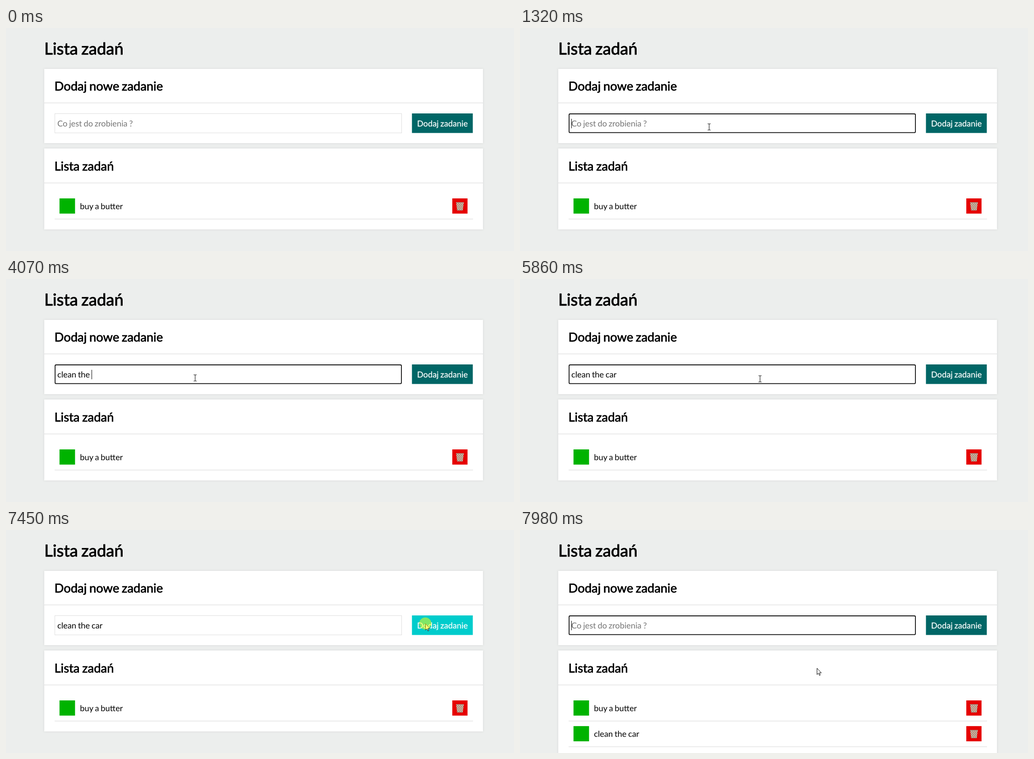
Write an HTML page that moves like this. It is 1128 px wide and 496 px high and loops after 8000 ms.

```html
<!DOCTYPE html>
<html lang="pl">
<head>
<meta charset="utf-8">
<title>Lista zadań</title>
<style>
  html, body { margin: 0; width: 100%; height: 100%; overflow: hidden; background: #eceeed; }
  svg { display: block; width: 1128px; height: 496px; font: 18.29px Lato, sans-serif; text-rendering: geometricPrecision; }
  text { word-spacing: -.05em; }
  .panel { fill: #fff; filter: drop-shadow(0 0 2.5px #d6d8d7); }
  .line { fill: #ddd; }
  .head { stroke: #000; stroke-linejoin: round; }
  .h1 { font-size: 36.57px; stroke-width: 1px; }
  .h2 { font-size: 27.43px; stroke-width: .8px; }
</style>
</head>
<body>
<svg viewBox="0 0 1128 496">
  <defs>
    <pattern id="mesh" width="4" height="5" x="999" y="388" patternUnits="userSpaceOnUse">
      <rect width="4" height="5" fill="#d9cdb9"/>
      <path d="M0 0l4 5M4 0l-4 5" stroke="#93604f" stroke-width=".9"/>
    </pattern>
    <g id="row">
      <rect x="118.8" y="379" width="34.5" height="33.8" fill="#00b300"/>
      <rect x="991" y="379" width="33.8" height="33.8" fill="#e60000"/>
      <path d="M999.5 388h17l-2.2 17.5h-12.6z" fill="url(#mesh)"/>
      <path d="M999 388.3h18M1001.7 405h12.6" stroke="#a39a8c" stroke-width="1.6"/>
      <rect class="line" x="108" y="424.3" width="929" height="1.2"/>
    </g>
    <path id="bar" d="M-3.5-7h2.5l1 1 1-1h2.5M0-6v12M-3.5 7h2.5l1-1 1 1h2.5"/>
  </defs>
  <text class="head h1" x="85" y="59">Lista zadań</text>

  <rect class="panel" x="85" y="91" width="974" height="165"/>
  <text class="head h2" x="107.5" y="139">Dodaj nowe zadanie</text>
  <rect class="line" x="85" y="166" width="974" height="1.2"/>
  <rect x="108.5" y="190.5" width="770" height="42.8" fill="#fff" stroke="#ddd"/>
  <rect id="ring" x="109" y="191" width="769" height="41.7" rx="2.5" fill="#fff" stroke="#101010" stroke-width="1.8"/>
  <text id="field" x="114" y="219"></text>
  <rect id="caret" y="202" width="1" height="21"/>
  <rect id="button" x="901.4" y="190" width="135.1" height="43.5"/>
  <text x="912.8" y="219" fill="#fff" stroke="#fff" stroke-width=".25">Dodaj zadanie</text>

  <rect id="list" class="panel" x="85" y="268" width="974" height="180"/>
  <text class="head h2" x="107.5" y="316.5">Lista zadań</text>
  <rect class="line" x="85" y="344" width="974" height="1.2"/>
  <use href="#row"/>
  <text x="164.3" y="402.7">buy a butter</text>
  <g id="added">
    <use href="#row" y="57.2"/>
    <text x="164.3" y="459.9">clean the car</text>
  </g>

  <path id="arrow" d="M.5.5v14l3.2-3 2.1 5 2.1-.9-2.1-4.8h4.4z" fill="#fff" stroke="#000"/>
  <g id="beam" fill="none">
    <use href="#bar" stroke="#fff" stroke-width="2.6"/>
    <use href="#bar" stroke="#222" stroke-width="1.2"/>
  </g>
  <circle id="click" r="13.5" fill="#ff0" fill-opacity=".5"/>
</svg>
<script>
const LOOP = 8000, ENTER = 90, FOCUS = 1160, PRESS = 7450, ADDED = 7550, BLINK = 600;
const $ = id => document.getElementById(id);
const show = (id, on) => $(id).setAttribute('visibility', on ? 'visible' : 'hidden');
const pen = document.createElement('canvas').getContext('2d');

// Each word is typed at its own steady pace
const words = [
  { text: 'clean ', at: 1720, gap: 240 },
  { text: 'the ', at: 3500, gap: 190 },
  { text: 'car', at: 4540, gap: 315 }
];
const keys = words.flatMap(w => [...w.text].map((char, i) => ({ char, at: w.at + i * w.gap })));

// Pointer moves along Bézier curves
const moves = [
  { from: ENTER, to: 850, curve: [[965, 484], [560, 405], [421, 231]] },
  { from: 910, to: 1040, curve: [[421, 231], [420, 220]] },
  { from: 5700, to: 6420, curve: [[421, 220], [760, 235], [900, 150], [925, 208]] },
  { from: 6510, to: 6610, curve: [[925, 208], [931, 208]] },
  { from: 7715, to: 7980, curve: [[931, 208], [659, 307]] }
];

const ease = p => (1 - Math.cos(Math.PI * p)) / 2;
const mix = (a, b, u) => a.map((v, k) => v + (b[k] - v) * u);
const bezier = (pts, u) => pts.length === 1 ? pts[0]
  : bezier(pts.slice(1).map((q, i) => mix(pts[i], q, u)), u);

function pointer(t) {
  const move = moves.filter(m => m.from <= t).pop() || moves[0];
  const p = (t - move.from) / (move.to - move.from);
  return bezier(move.curve, ease(Math.min(1, Math.max(0, p))));
}

function draw(t) {
  const done = keys.filter(k => k.at <= t);
  const typed = t < ADDED ? done.map(k => k.char).join('') : '';
  const field = $('field');
  field.textContent = typed || 'Co jest do zrobienia ?';
  field.setAttribute('fill', typed ? '#000' : '#757575');

  const focused = t >= FOCUS && t < PRESS || t >= ADDED;
  const lastInput = t >= ADDED ? ADDED : done.length ? done[done.length - 1].at : FOCUS;
  const spaces = typed.split(' ').length - 1;
  pen.font = '18.29px Lato, sans-serif';
  $('caret').setAttribute('x', Math.round(114 + pen.measureText(typed).width - spaces * .9));
  show('caret', focused && (t - lastInput) % (2 * BLINK) < BLINK);
  show('ring', focused);

  const [x, y] = pointer(t).map(Math.round);
  const inside = (l, top, r, b) => x >= l && x < r && y >= top && y < b;
  const beam = inside(108, 190, 879, 235);
  const hover = inside(901, 190, 1037, 234);
  const pressed = t >= PRESS && t < ADDED;
  $('button').setAttribute('fill', pressed ? '#00cccc' : hover ? '#009999' : '#006666');

  for (const id of ['arrow', 'beam', 'click']) $(id).setAttribute('transform', `translate(${x} ${y})`);
  show('arrow', t >= ENTER && !beam);
  show('beam', t >= ENTER && beam);
  show('click', pressed || t >= FOCUS && t < FOCUS + 110);

  show('added', t >= ADDED);
  $('list').setAttribute('height', t >= ADDED ? 237 : 180);
}

const start = performance.now();
function tick() {
  draw((performance.now() - start) % LOOP);
  requestAnimationFrame(tick);
}
tick();
</script>
</body>
</html>
```
